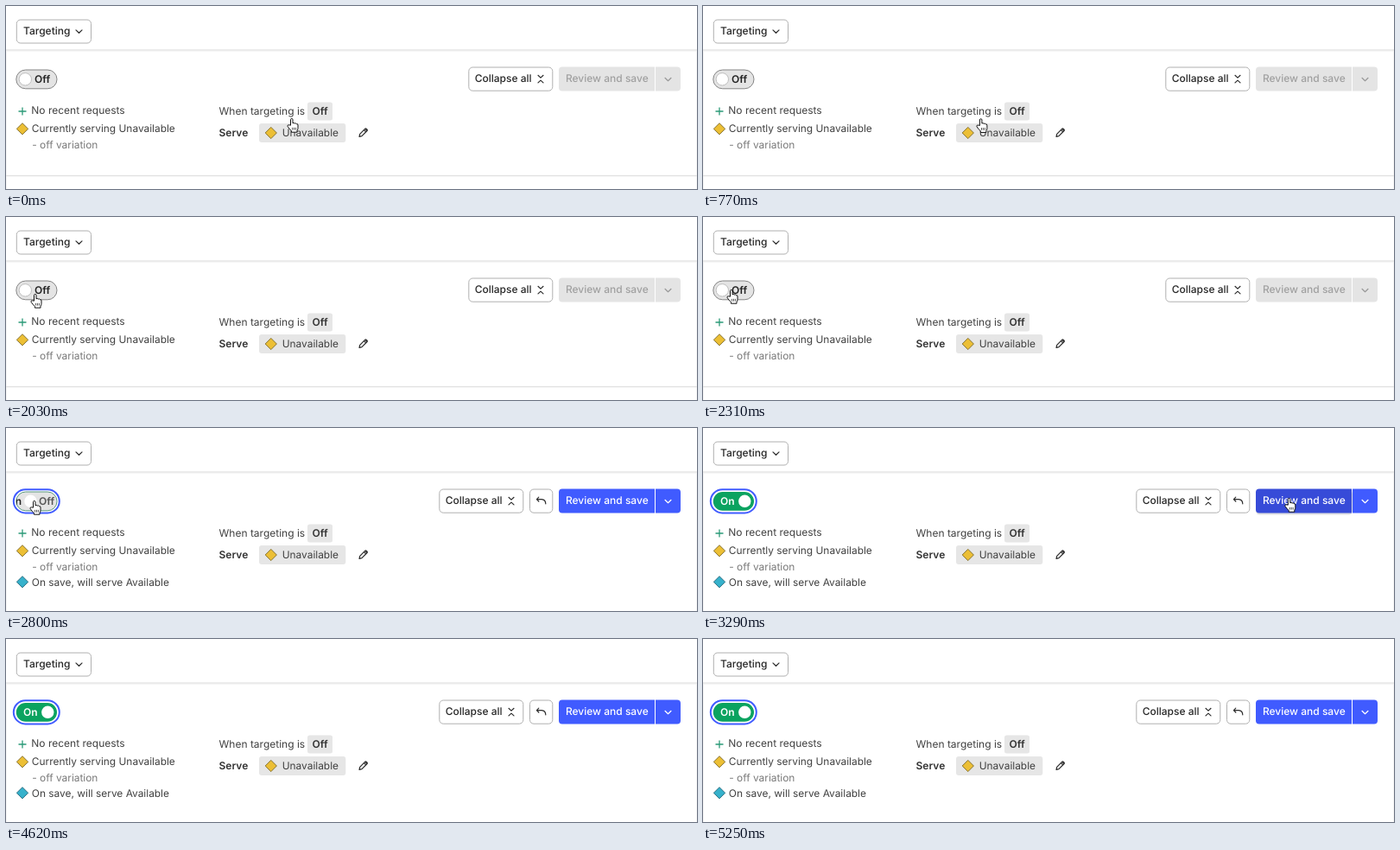
Animation, 800 px wide and 212 px high, one loop 5.39 s. Source, as an HTML page:

```html
<!DOCTYPE html>
<html lang="en">
<head>
<meta charset="utf-8">
<title>Targeting toggle</title>
<style>
  html, body { margin: 0; width: 100%; height: 100%; overflow: hidden; background: #fff; }
  svg { display: block; font: 400 12px Inter, Arial, sans-serif; fill: #414141; text-rendering: geometricPrecision; }
  .med { font-weight: 500; fill: #282828; }
  .semi { font-weight: 600; fill: #333; }
  .status { font-size: 11.92px; }
  .box { fill: #fff; stroke: #b0b0b0; }
  .chip { fill: #e6e6e6; }
  .line { fill: none; stroke: #2c2c2c; stroke-width: 1.2; stroke-linecap: round; stroke-linejoin: round; }
  .muted { fill: #7a7a7a; }
  .cursor { fill: #fff; stroke: #111; stroke-width: 1; stroke-linejoin: round; }
</style>
</head>
<body>
<svg width="800" height="212" viewBox="0 0 800 212">
  <defs>
    <path id="diamond" d="M0-6.6 6.6 0 0 6.6-6.6 0z" stroke-width="1" stroke-linejoin="round"/>
    <path id="chevron" d="M-3.5-1.7 0 1.7 3.5-1.7"/>
    <clipPath id="pill"><rect x="12" y="74" width="47" height="22" rx="11"/></clipPath>
  </defs>

  <rect class="box" x="12.3" y="16" width="86.2" height="27" rx="4.5"/>
  <text class="med" x="20" y="33.2">Targeting</text>
  <use href="#chevron" class="line" x="84.5" y="29.6"/>

  <rect y="50" width="800" height="2.4" fill="#ebebeb"/>
  <path d="M.5 52V212M799.5 52V212" stroke="#f5f5f5"/>
  <rect id="divider" y="196" width="800" height="1.3" fill="#e2e2e2"/>

  <g id="toggle">
    <rect id="ring" x="8.8" y="71.2" width="53" height="27.2" rx="13.6" fill="#fff" stroke="#405bff" stroke-width="2"/>
    <rect id="track" x="11.8" y="74" width="47.2" height="21.8" rx="10.9"/>
    <g clip-path="url(#pill)">
      <text id="onText" class="semi" y="89">On</text>
      <text id="offText" class="semi" y="89">Off</text>
      <circle id="knob" cy="84.8" r="7.2" fill="#fff"/>
    </g>
  </g>

  <g id="collapse">
    <rect class="box" x="535.8" y="71" width="97" height="27.2" rx="4.5"/>
    <text class="med" x="542.7" y="88.3">Collapse all</text>
    <path class="line" d="M616 80.3l3 2.8 3-2.8M616 88.9l3-2.8 3 2.8"/>
  </g>
  <g id="undo">
    <rect class="box" x="606.5" y="71" width="26.3" height="27.2" rx="4.5"/>
    <path class="line" d="M616.8 80.2l-2.4 2.4 2.4 2.4M614.6 82.6h5.6q4.4.3 4.6 5.2"/>
  </g>
  <rect id="shadow" x="640" y="72" width="112" height="28.5" rx="4.5" fill="#000" opacity=".12"/>
  <path id="save" d="M644 70.6H751V98.4H644Q640 98.4 640 94.4V74.6Q640 70.6 644 70.6"/>
  <path id="more" d="M752 70.6H777Q781 70.6 781 74.6V94.4Q781 98.4 777 98.4H752z"/>
  <text id="saveText" class="med" x="647.9" y="88.4">Review and save</text>
  <use id="moreIcon" href="#chevron" class="line" x="766.5" y="85"/>

  <path d="M14.5 122h9M19 117.5v9" fill="none" stroke="#2b9a78" stroke-width="1.3"/>
  <text x="29.3" y="125.4">No recent requests</text>
  <use href="#diamond" x="19" y="142.3" fill="#ecbf35" stroke="#85712f"/>
  <text class="status" x="29.8" y="146.3">Currently serving Unavailable</text>
  <text class="status muted" x="30.3" y="164.6">- off variation</text>
  <g id="pending">
    <use href="#diamond" x="19" y="178.3" fill="#36b1cb" stroke="#2b6f82"/>
    <text class="status" x="29.8" y="182.5">On save, will serve Available</text>
  </g>

  <text x="246.5" y="126.3">When targeting is</text>
  <rect class="chip" x="349" y="111.5" width="29" height="21" rx="2.5"/>
  <text class="semi" x="354.5" y="126.3">Off</text>
  <text class="semi" x="246.5" y="151">Serve</text>
  <rect class="chip" x="293" y="136" width="100.3" height="22" rx="3"/>
  <use href="#diamond" x="306.8" y="147" fill="#ecbf35" stroke="#85712f"/>
  <text class="status" x="319.7" y="151">Unavailable</text>
  <path class="line" stroke-width="1.4" d="M409 151.3l.7-3 6.1-6.1q.8-.6 1.5.1l.8.8q.6.7 0 1.4l-6.1 6.1zM414.4 143.6l2.3 2.3M416 142.8l1.6 1.6"/>

  <g id="cursor" class="cursor">
    <g id="hand">
      <path d="M-1.5 7.2V.7a1.25 1.25 0 0 1 2.5 0V4.8q1.3-1.1 2.2.3 1.4-.8 2.1.5 1.7-.4 1.7 1.4V10.2q0 1.7-1 3V15.2H-.6V13.6Q-3 11.4-4.9 8.5-5.4 6.7-3.6 6.8z"/>
      <path d="M.6 9.8v2.8M2.5 9.8v2.8M4.4 9.8v2.8" stroke-width=".7"/>
    </g>
    <path id="arrow" d="M0 0V12.5L2.9 9.8 4.8 14 6.8 13.1 5 9.1H9z"/>
    <path id="beam" d="M-3-7Q0-7 0-5 0-7 3-7M0-5V5M-3 7Q0 7 0 5 0 7 3 7M-1.5 1h3" fill="none"/>
  </g>
</svg>
<script>
const LOOP = 5390, STEP = 70, CLICK = 2800;
const el = id => document.getElementById(id);
const set = (id, attrs) => { for (const k in attrs) el(id).setAttribute(k, attrs[k]); };
const show = (id, on) => { el(id).style.display = on ? '' : 'none'; };
const paint = (id, fill) => { el(id).style.fill = fill; };

// Pointer stops: time, x, y of the hot spot
const stops = [
  [0, 331, 131], [700, 331, 131], [1260, 119, 137], [1610, 119, 137],
  [2030, 34, 90], [2170, 33, 85], [2800, 33, 85], [3290, 678.8, 82],
  [3990, 678.8, 82], [4060, 694.5, 75], [4270, 815, 71]
];

function pointer(t) {
  const i = stops.findIndex(s => s[0] > t);
  if (i < 0) return stops[stops.length - 1].slice(1);
  const [t0, x0, y0] = stops[i - 1], [t1, x1, y1] = stops[i];
  const u = (t - t0) / (t1 - t0), e = u * u * (3 - 2 * u);
  return [x0 + (x1 - x0) * e, y0 + (y1 - y0) * e];
}

function pointerShape(x, y, on) {
  const within = (l, t, r, b) => x >= l && x <= r && y >= t && y <= b;
  const left = on ? 502 : 536;
  if (within(12, 72, 60, 98) || within(left, 71, left + 97, 98) ||
      within(300, 128, 393, 158) || (on && within(607, 71, 781, 98))) return 'hand';
  return within(30, 114, 196, 150) ? 'beam' : 'arrow';
}

function drawToggle(t) {
  const on = t >= CLICK, sliding = on && t < CLICK + STEP, done = on && !sliding;
  show('ring', on);
  set('track', {
    fill: done ? '#0ba360' : '#e4e4e4',
    stroke: done ? 'none' : sliding ? '#5c9a80' : '#858585'
  });
  set('knob', {
    cx: done ? 48.3 : sliding ? 28.5 : 22.3,
    stroke: done || sliding ? 'none' : '#bdbdbd'
  });
  show('onText', on);
  show('offText', !done);
  set('onText', { x: done ? 20 : 1.5 });
  set('offText', { x: sliding ? 38 : 33 });
  paint('onText', done ? '#fff' : '#222');
  paint('offText', sliding ? '#555' : '#222');
}

function drawActions(on, x, y) {
  const over = (l, r) => on && x >= l && x < r && y >= 71 && y <= 98;
  const fill = hover => !on ? '#e4e4e4' : hover ? '#374bd8' : '#405bff';
  set('collapse', { transform: `translate(${on ? -34 : 0} 0)` });
  show('undo', on);
  show('pending', on);
  show('divider', !on);
  show('shadow', over(640, 751));
  paint('save', fill(over(640, 751)));
  paint('more', fill(over(752, 781)));
  paint('saveText', on ? '#fff' : '#a0a0a0');
  el('moreIcon').style.stroke = on ? '#fff' : '#999';
}

function draw(now) {
  const t = Math.floor((now % LOOP) / STEP) * STEP;
  const on = t >= CLICK, [x, y] = pointer(t), shape = pointerShape(x, y, on);
  drawToggle(t);
  drawActions(on, x, y);
  set('cursor', { transform: `translate(${x} ${y})` });
  for (const id of ['hand', 'arrow', 'beam']) show(id, id === shape);
}

const start = performance.now();
function tick() {
  draw(performance.now() - start);
  requestAnimationFrame(tick);
}
tick();
</script>
</body>
</html>
```
